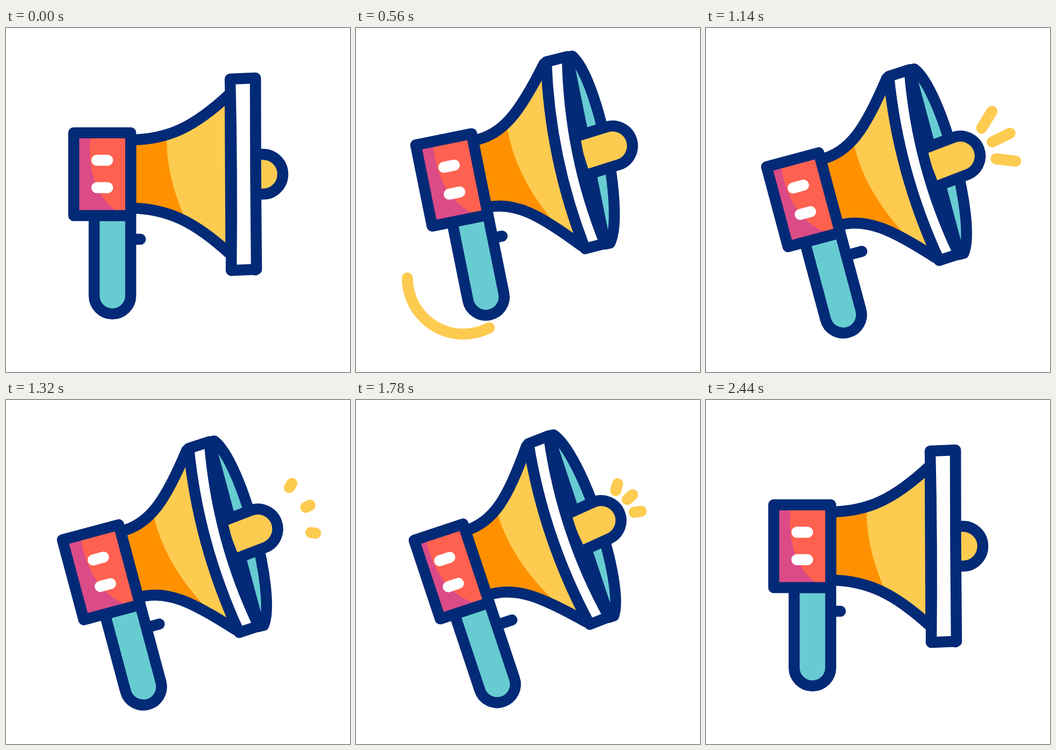
These frames come from a looping animation (640x640 px, 3200 ms). An HTML page with a canvas:

```html
<!DOCTYPE html>
<html lang="en">
<head>
<meta charset="utf-8">
<title>Megaphone</title>
<style>
  html, body { margin: 0; width: 100%; height: 100%; overflow: hidden; background: #fff; }
  canvas { display: block; }
</style>
</head>
<body>
<canvas id="stage" width="640" height="640"></canvas>
<script>
const ctx = document.getElementById('stage').getContext('2d');
const LOOP = 3200;
const NAVY = '#032a76', YELLOW = '#fdcb50', ORANGE = '#ff9100',
      CORAL = '#ff6150', PINK = '#db4b87', TEAL = '#67ccd1', WHITE = '#fff';

const rad = deg => deg * Math.PI / 180;

// Smooth step from 0 to 1 between two times
function ease(t, from, to) {
  const u = Math.min(1, Math.max(0, (t - from) / (to - from)));
  return u * u * (3 - 2 * u);
}

// Rises to 1 at the peak and falls back to 0
const pulse = (t, from, peak, to) => ease(t, from, peak) - ease(t, peak, to);

function poseAt(t) {
  const swing = ease(t, 220, 720) - ease(t, 1780, 2440);
  const hop = pulse(t, 220, 400, 760);
  const brace = pulse(t, 1200, 1500, 1700);
  const shout1 = pulse(t, 800, 1140, 1450);
  const shout2 = pulse(t, 1520, 1780, 2440);
  const recoil = pulse(t, 1780, 2100, 2440);
  return {
    x: 222 - 2 * swing - 6 * shout2 + 11 * recoil,
    y: 272 + 37 * swing - 45 * hop - 2 * shout2 + 24 * recoil,
    tilt: 15 * swing + 3.4 * shout2,
    open: ease(t, 220, 560) - ease(t, 1760, 2400),
    pull: 13 * brace - 5.5 * shout1 - 10 * shout2,
    trigger: 12 * (shout1 + shout2) + 7 * brace,
    nose: 256 + 7 * (ease(t, 220, 600) - ease(t, 1140, 1500)) - 4 * brace
  };
}

function shape(d, fill, stroke = NAVY) {
  const path = new Path2D(d);
  if (fill) { ctx.fillStyle = fill; ctx.fill(path); }
  if (stroke) { ctx.strokeStyle = stroke; ctx.stroke(path); }
}

// Fill the outline, lay a second tone inside it, then stroke it
function twoTone(d, base, toneShape, tone) {
  shape(d, base, null);
  ctx.save();
  ctx.clip(new Path2D(d));
  shape(toneShape, tone, null);
  ctx.restore();
  shape(d);
}

function megaphone({ open, pull, trigger, nose }) {
  const mix = (a, b) => a + (b - a) * open;
  const left = mix(195, 172.5), right = mix(242, 213);
  const top = mix(-178, -181.5), bottom = mix(178, 173.5);
  const mid = (top + bottom) / 2, bend = 33 * open;

  // Mouth
  const lip = right + 9 * open, bulge = right + 48 * open;
  shape(`M${right} ${top} H${lip}
    C${bulge} ${top + 50} ${bulge} ${bottom - 50} ${lip} ${bottom} H${right} Z`, TEAL);

  // Nose, tipped slightly upwards while the mouth is open
  ctx.save();
  ctx.translate(235, 0);
  ctx.rotate(rad(-6 * open));
  const base = right - bend / 2 - 235;
  shape(`M${base} -37 H${nose - 235} a37 37 0 0 1 0 74 H${base} Z`, YELLOW);
  ctx.restore();

  // Horn
  const end = mix(195, 168), c1 = mix(78, 65), c2 = mix(128, 105);
  const y1 = mix(64, 62), y2 = mix(87, 97);
  twoTone(`M10 -64 C${c1} ${-y1} ${c2} ${-y2} ${end} ${mix(-150, -178)}
    L${end + 1.5} ${mix(150, 168)} C${c2} ${y2} ${c1} ${y1} 10 63 Z`, ORANGE,
    'M77 -200 V-72 Q75 8 117 95 L170 200 H300 V-200 Z', YELLOW);

  // Rim
  shape(`M${left} ${top + 1} L${right} ${top - 1}
    Q${right - bend} ${mid} ${mix(right + 2, right)} ${bottom - 1}
    L${left + 2} ${bottom + 1} Q${left + 4 - bend} ${mid} ${left} ${top + 1} Z`, WHITE);

  // Trigger, grip and back
  shape(`M10 121 H${28 + trigger}`);
  shape('M-58 77 V226 a34 34 0 0 0 68 0 V77 Z', TEAL);
  twoTone(`M${-96 - pull} -77 H10 V77 H${-96 - pull} Z`, CORAL,
    'M-200 -67 H-65 Q-72 25 -19 67 L-10 80 H-200 Z', PINK);
  shape('M-53 -26 h20 M-53 25 h20', null, WHITE);
}

// Three rays that shoot out from the nose and vanish from the inside
function sparks(t, start, turn) {
  const head = 46 * ease(t, start, start + 200);
  const tail = 46 * ease(t, start + 220, start + 640);
  if (head - tail < 0.1) return;
  ctx.save();
  ctx.translate(255, 0);
  ctx.rotate(rad(turn));
  for (let i = -1; i <= 1; i++) {
    const spot = rad(-22 + 24.5 * i), aim = rad(-23 + 32.5 * i);
    const at = r => `${64 * Math.cos(spot) + r * Math.cos(aim)} ${64 * Math.sin(spot) + r * Math.sin(aim)}`;
    shape(`M${at(tail)} L${at(head)}`, null, YELLOW);
  }
  ctx.restore();
}

// Arc that follows the grip: drawn until the peak, then wiped from its start
function swoosh(t, cx, cy, from, to, start, peak, end) {
  const head = ease(t, start, peak), tail = ease(t, peak, end);
  if (head - tail < 0.01) return;
  const angle = u => rad(from + (to - from) * u);
  ctx.beginPath();
  ctx.arc(cx, cy, 104.5, angle(tail), angle(head), to < from);
  ctx.strokeStyle = YELLOW;
  ctx.stroke();
}

function draw() {
  const t = performance.now() % LOOP;
  const pose = poseAt(t);

  ctx.fillStyle = WHITE;
  ctx.fillRect(0, 0, 640, 640);
  ctx.lineWidth = 20.5;
  ctx.lineCap = ctx.lineJoin = 'round';
  swoosh(t, 200, 465, 180, 62.5, 360, 560, 770);
  swoosh(t, 459.5, 497, -13, 107, 1890, 2100, 2410);

  ctx.save();
  ctx.translate(pose.x, pose.y);
  ctx.rotate(rad(-pose.tilt));
  megaphone(pose);
  sparks(t, 800, 12);
  sparks(t, 1710, 0);
  ctx.restore();
  requestAnimationFrame(draw);
}
draw();
</script>
</body>
</html>
```
